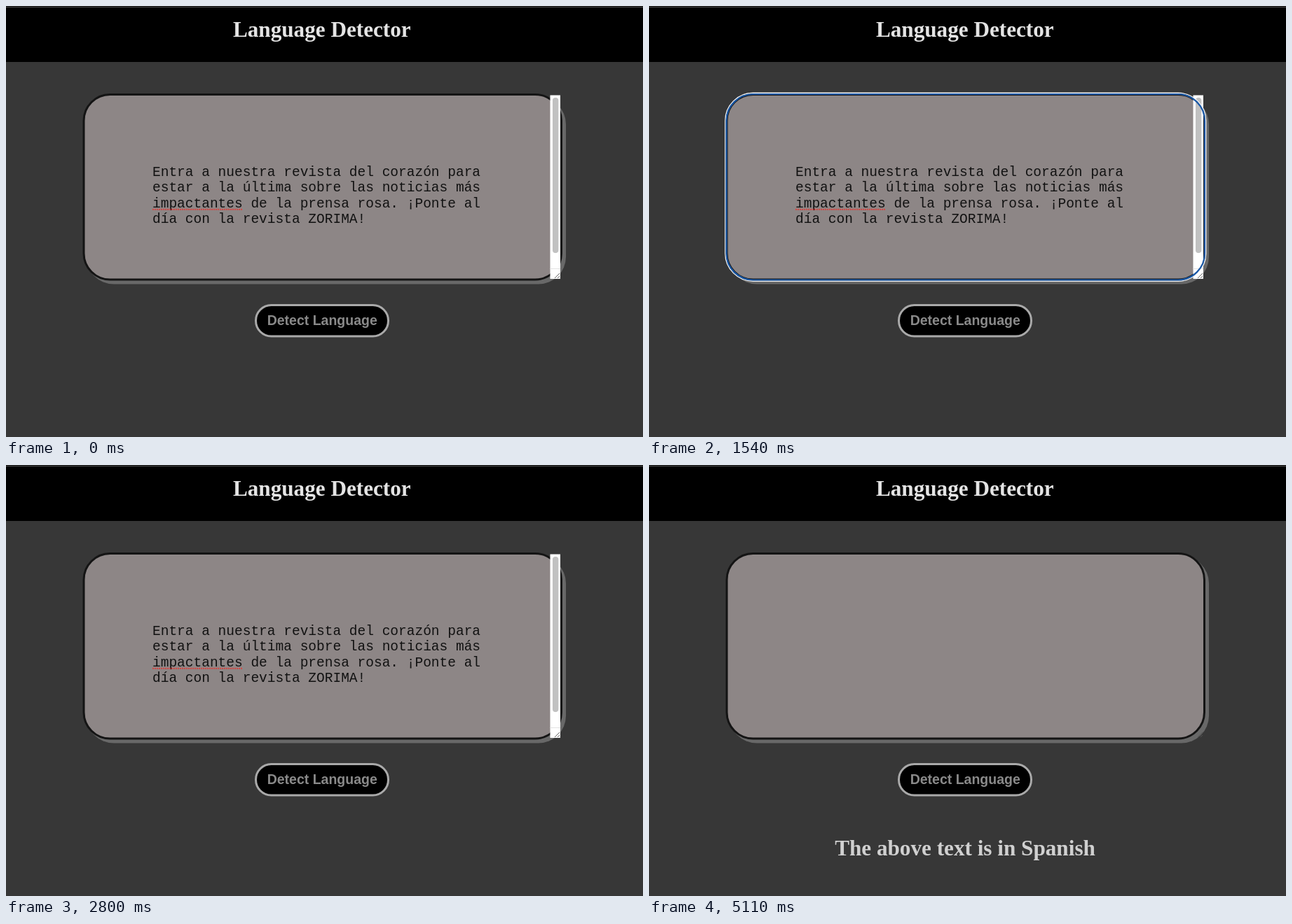
Write an HTML page that moves like this. It is 909x616 px and loops after 5.67 s.

```html
<!DOCTYPE html>
<html lang="en">
<head>
<meta charset="utf-8">
<title>Language Detector</title>
<style>
  html, body { margin: 0; width: 100%; height: 100%; overflow: hidden; background: #373737; }
  svg { display: block; width: 909px; height: 616px; }
  .head { font: bold 31.2px "Liberation Serif", Times, serif; text-anchor: middle; }
  .label { font: bold 19.5px "Liberation Sans", Arial, sans-serif; text-anchor: middle; }
  .entry { font: 19.5px "Courier New", "Liberation Mono", monospace; fill: #121212; }
  .shadow { fill: #686868; filter: blur(.6px); }
</style>
</head>
<body>
<svg viewBox="0 0 909 616">
  <rect width="909" height="616" fill="#373737"/>
  <rect width="909" height="80"/>
  <path d="M0 1.5H909" stroke="#555"/>
  <text class="head" x="450.8" y="44" fill="#e4e4e4">Language Detector</text>

  <rect class="shadow" x="114.5" y="130" width="684.5" height="267.5" rx="39"/>
  <rect x="111" y="126.5" width="681.5" height="264.5" rx="37.5" fill="#8d8686" stroke="#141414" stroke-width="3"/>

  <g id="typed">
    <g class="entry">
      <text x="209" y="243">Entra a nuestra revista del corazón para</text>
      <text x="209" y="265.4">estar a la última sobre las noticias más</text>
      <text x="209" y="287.8">impactantes de la prensa rosa. ¡Ponte al</text>
      <text x="209" y="310.2">día con la revista ZORIMA!</text>
    </g>
    <path d="M209 290.7H337.5" stroke="#d8433f" stroke-width="2" stroke-dasharray="2 1"/>
    <rect x="776.5" y="127.5" width="14.5" height="262.5" fill="#fff"/>
    <rect x="780" y="131" width="8.3" height="222" rx="4.1" fill="#c1c1c1"/>
    <path d="M776.5 375.5H791" stroke="#e2e2e2"/>
  </g>
  <path d="M783 389L790 382M787 389L790 386" stroke="#555" stroke-width=".9"/>

  <g id="ring" fill="none">
    <rect x="108.8" y="124.3" width="685.9" height="268.9" rx="39.7" stroke="#f4f6f8" stroke-width="1.4"/>
    <rect x="110.5" y="126" width="682.5" height="265.5" rx="38" stroke="#1a58a6" stroke-width="2.2"/>
  </g>
  <path id="caret" d="M514.5 293V315" stroke="#000"/>

  <rect x="356.5" y="427.5" width="189" height="44.5" rx="22" stroke="#a9a9a9" stroke-width="3"/>
  <text class="label" x="451.2" y="456" fill="#898989">Detect Language</text>
  <text class="head" id="result" x="451" y="558" fill="#d0d0d0">The above text is in Spanish</text>
</svg>
<script>
  const LOOP = 5670, FOCUS = 1050, BLINK = 490, BLUR = 2100, ANSWER = 2940;
  const show = (id, on) =>
    document.getElementById(id).setAttribute("visibility", on ? "visible" : "hidden");

  function draw(now) {
    const t = now % LOOP;
    show("ring", t >= FOCUS && t < BLUR);
    show("caret", t >= FOCUS && t < FOCUS + BLINK);
    show("typed", t < ANSWER);
    show("result", t >= ANSWER);
    requestAnimationFrame(draw);
  }
  draw(0);
</script>
</body>
</html>
```
